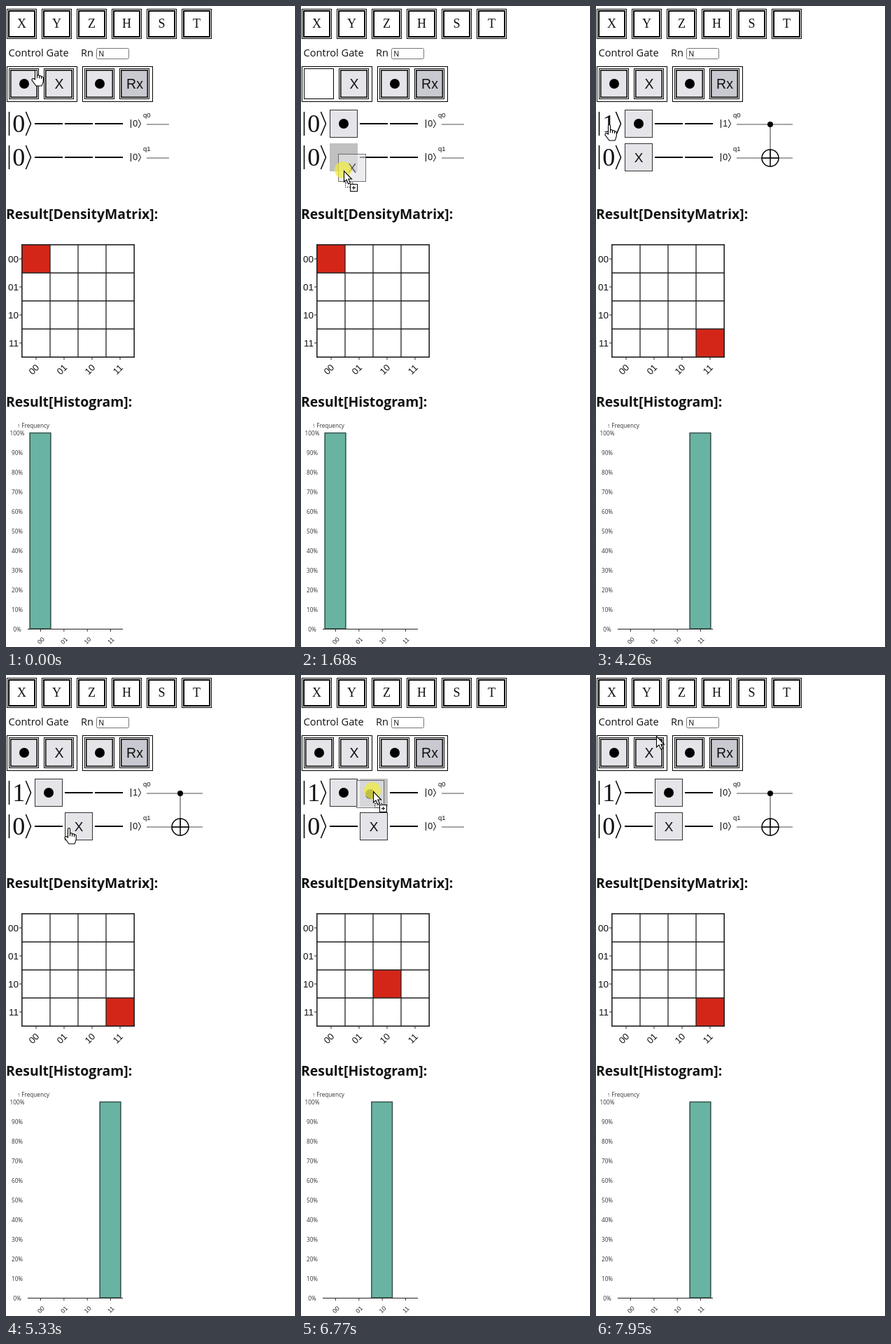
An HTML page with a canvas that plays this animation: 413x915 px, repeating every 8 s.

```html
<!DOCTYPE html>
<html lang="en">
<head>
<meta charset="utf-8">
<title>Quantum circuit editor</title>
<style>
html, body { margin: 0; width: 100%; height: 100%; overflow: hidden; background: #fff; }
canvas { display: block; }
</style>
</head>
<body>
<canvas id="stage" width="413" height="915"></canvas>
<script>
const ctx = document.getElementById('stage').getContext('2d');
const LOOP = 8000;
const SANS = '"Liberation Sans", sans-serif';
const SERIF = '"Liberation Serif", serif';
const UI = '"Open Sans", sans-serif';
const BASIS = ['00', '01', '10', '11'];

// Cursor path: time, x, y
const PATH = [
  [0, 43, 91], [69, 43, 91], [70, 31, 111], [269, 31, 111], [270, 55, 151], [430, 55, 151],
  [480, 61, 167], [560, 61, 167], [850, 63, 114], [960, 63, 114], [1140, 58, 195],
  [1250, 58, 195], [1480, 61, 235], [2480, 61, 235], [2900, 33, 168], [3240, 33, 168],
  [3310, 19, 169], [4320, 19, 169], [4600, 56, 216], [4680, 56, 216], [5000, 90, 218],
  [5930, 90, 218], [6090, 65, 164], [6300, 65, 164], [6700, 103, 166], [7600, 103, 168],
  [7930, 86, 87], [8000, 86, 87]
];
const DRAGS = [
  { gate: 'dot', start: 270, over: 440, drop: 500, dx: 25, dy: 20, col: 0, row: 0 },
  { gate: 'X', start: 960, over: 1310, drop: 1750, dx: 8, dy: 24, col: 0, row: 1 },
  { gate: 'X', start: 4680, over: 4800, drop: 5070, dx: 15, dy: 20, col: 1, row: 1 },
  { gate: 'dot', start: 6300, over: 6500, drop: 6900, dx: 24, dy: 16, col: 1, row: 0 }
];
const PRESSES = [[70, 500], [900, 1750], [3040, 3240], [4600, 5070], [6160, 6900]];
// Measured basis state, the time it shows and the time its bars start moving
const RESULTS = [
  { state: 0, at: 0, bars: -1000 }, { state: 3, at: 3240, bars: 3110 },
  { state: 2, at: 5620, bars: 5620 }, { state: 3, at: 6970, bars: 6920 }
];
const BAR_TIME = 380, STAGGER = 0.08;

const HAND = new Path2D('M-1.5 14V2Q-1.5 .5 0 .5T1.5 2V8Q4 7 4.5 9Q7 8 7.5 10Q10.3 9.5 10.3 12V16Q10 19 8 23H0Q-3 19 -6 15Q-6 12 -3.5 12.6Z');
const KNUCKLES = new Path2D('M1.5 8V12M4.5 9V12.5M7.5 10V13');
const ARROW = new Path2D('M.5 .5V16L4 12.8L6.8 19L9.4 17.8L6.8 12H11.5Z');

const within = (t, a, b) => t >= a && t < b;
const clamp = v => Math.min(1, Math.max(0, v));
const easeCubic = u => u < 0.5 ? 4 * u ** 3 : 1 - 4 * (1 - u) ** 3;
const slotX = col => 41 + 43 * col;
const slotY = row => 148 + 48 * row;

function text(str, x, y, size, family, { align = 'left', weight = 400, color = '#111', turn = 0 } = {}) {
  ctx.save();
  ctx.translate(x, y);
  ctx.rotate(turn);
  ctx.font = `${weight} ${size}px ${family}`;
  ctx.textAlign = align;
  ctx.fillStyle = color;
  ctx.fillText(str, 0, 0);
  ctx.restore();
}
function line(points, width = 1, color = '#000') {
  ctx.beginPath();
  points.forEach(([x, y]) => ctx.lineTo(x, y));
  ctx.lineWidth = width;
  ctx.strokeStyle = color;
  ctx.stroke();
}
function box(x, y, w, h, fill, stroke, width = 1) {
  if (fill) { ctx.fillStyle = fill; ctx.fillRect(x, y, w, h); }
  if (stroke) {
    ctx.strokeStyle = stroke;
    ctx.lineWidth = width;
    ctx.strokeRect(x + width / 2, y + width / 2, w - width, h - width);
  }
}
function disc(x, y, r, fill = '#000') {
  ctx.beginPath();
  ctx.arc(x, y, r, 0, 2 * Math.PI);
  ctx.fillStyle = fill;
  ctx.fill();
}
function shape(path, fill) {
  ctx.lineWidth = 1.1;
  ctx.strokeStyle = '#000';
  if (fill) { ctx.fillStyle = fill; ctx.fill(path); }
  ctx.stroke(path);
}

function gateLabel(label, cx, cy, size) {
  if (label === 'dot') disc(cx, cy, 7);
  else text(label, cx, cy + size * 0.36, size, SANS, { align: 'center' });
}
function paletteGate(label, x, fill = '#e4e4e9') {
  box(x, 89, 43, 44, '#fff', '#000');
  if (!label) return;
  box(x + 2, 91, 39, 40, fill, '#000', 1.5);
  gateLabel(label, x + 22, 111, 19.5);
}
function slotGate(label, x, y) {
  box(x, y, 40, 40, '#e4e4e9', '#333');
  gateLabel(label, x + 20, y + 20, 19);
}
function ket(digit, x, y, size, w, h, weight, family) {
  line([[x, y - h], [x, y + h]], weight);
  text(digit, x + w * 0.44, y + size * 0.34, size, family, { align: 'center' });
  line([[x + w * 0.77, y - h], [x + w, y], [x + w * 0.77, y + h]], weight);
}

function drawPalette(t) {
  [...'XYZHST'].forEach((name, i) => {
    const x = 1 + 50 * i;
    box(x, 4, 43, 43, '#fff', '#000');
    box(x + 2, 6, 39, 39, null, '#000', 2);
    text(name, x + 21.5, 31, 18, SERIF, { align: 'center' });
  });
  text('Control Gate', 3.5, 72, 14.6, UI);
  text('Rn', 107, 72, 14.6, UI);
  ctx.beginPath();
  ctx.roundRect(129.5, 60.5, 46, 15, 2);
  ctx.lineWidth = 1;
  ctx.strokeStyle = '#767676';
  ctx.stroke();
  text('N', 132.5, 72, 10.5, SANS);

  box(1, 86, 101, 51, null, '#000');
  box(109, 86, 101, 51, null, '#000');
  paletteGate(within(t, 500, 1750) ? '' : 'dot', 4);
  paletteGate('X', 54);
  paletteGate('dot', 112);
  paletteGate('Rx', 162, '#c9c9d1');
}

function drawCircuit(t, drag) {
  const linked = within(t, 1820, 5620) || t >= 6970;
  const placed = [-1, -1];
  DRAGS.forEach(d => { if (t >= d.drop) placed[d.row] = d.col; });
  for (const row of [0, 1]) {
    const y = slotY(row) + 20;
    ket(row === 0 && t >= 3240 ? '1' : '0', 4.5, y, 36, 31, 17, 1.5, SERIF);
    for (let col = 0; col < 3; col++) {
      const x = slotX(col);
      if (placed[row] === col) slotGate(row ? 'X' : 'dot', x, slotY(row));
      else if (drag && t >= drag.over && drag.row === row && drag.col === col) box(x, slotY(row), 40, 40, '#c0c0c0');
      else line([[x, y], [x + 40, y]], 2);
    }
    ket(row === 0 && within(t, 3240, 5620) ? '1' : '0', 178.5, y, 12.5, 14, 6, 1, SANS);
    text('q' + row, 196, y - 9, 9.5, SANS);
    line([[201, y + 1], [linked ? 281 : 233, y + 1]], 1.5, '#888');
  }
  if (!linked) return;
  line([[249, 169], [249, 217]], 1.2, '#555');
  disc(249, 169, 4);
  ctx.beginPath();
  ctx.arc(249, 217, 12, 0, 2 * Math.PI);
  ctx.lineWidth = 1.5;
  ctx.strokeStyle = '#000';
  ctx.stroke();
  line([[249, 205], [249, 229]], 1.5);
  line([[237, 217], [261, 217]], 1.5);
}

function drawMatrix(t) {
  text('Result[DensityMatrix]:', 0, 304, 19.4, UI, { weight: 700 });
  const { state } = RESULTS.findLast(r => t >= r.at);
  box(23 + 40 * state, 341 + 40 * state, 40, 40, '#d32618');
  BASIS.forEach((name, i) => {
    const mid = 40 * i + 20;
    if (i) {
      line([[23 + 40 * i, 341], [23 + 40 * i, 501]], 1.3, '#222');
      line([[23, 341 + 40 * i], [183, 341 + 40 * i]], 1.3, '#222');
    }
    line([[19, 341 + mid], [23, 341 + mid]], 1, '#222');
    line([[23 + mid, 501], [23 + mid, 505]], 1, '#222');
    text(name, 18, 346 + mid, 13.5, SANS, { align: 'right' });
    text(name, 23 + mid, 522, 13, SANS, { align: 'center', turn: -Math.PI / 4 });
  });
  box(22, 340, 162, 162, null, '#222', 1.6);
}

function drawHistogram(t) {
  text('Result[Histogram]:', 0, 572, 19.4, UI, { weight: 700 });
  text('↑', 18, 602, 8.5, UI, { align: 'center', color: '#333' });
  text('Frequency', 62, 602, 8.2, UI, { align: 'right', color: '#333' });
  for (let p = 0; p <= 100; p += 10) {
    text(p + '%', 16, 893 - 2.8 * p, 8.2, UI, { align: 'center', color: '#333' });
  }
  const k = RESULTS.findLastIndex(r => t >= r.bars);
  const now = RESULTS[k], before = RESULTS[Math.max(0, k - 1)];
  BASIS.forEach((name, i) => {
    const x = 34 + 33.33 * i;
    const u = easeCubic(clamp((t - now.bars) / BAR_TIME - STAGGER * i));
    const h = 280 * ((before.state === i) * (1 - u) + (now.state === i) * u);
    if (h > 0.5) box(x - 0.5, 889.5 - h - 0.7, 31, h + 0.9, '#69b3a2', '#36504a', 1.4);
    line([[x + 15.5, 889], [x + 15.5, 893]], 1, '#333');
    text(name, x + 18, 908, 8.8, SANS, { align: 'center', turn: -Math.PI / 4, color: '#222' });
  });
  line([[31, 889.5], [167, 889.5]], 1, '#222');
}

function cursorAt(t) {
  const i = PATH.findIndex(p => p[0] > t);
  const [t0, x0, y0] = PATH[i - 1], [t1, x1, y1] = PATH[i];
  const u = (t - t0) / (t1 - t0), s = u * u * (3 - 2 * u);
  return [Math.round(x0 + (x1 - x0) * s), Math.round(y0 + (y1 - y0) * s)];
}
function drawCursor(t, drag) {
  const [x, y] = cursorAt(t);
  if (drag) {
    ctx.globalAlpha = 0.65;
    slotGate(drag.gate, x - drag.dx, y - drag.dy);
    ctx.globalAlpha = 1;
  }
  if (PRESSES.some(([a, b]) => within(t, a, b))) disc(x - 1, y - 1, 12, 'rgba(240,235,60,.72)');
  ctx.save();
  ctx.translate(x, y);
  if (drag) {
    ctx.setLineDash([1.5, 1.5]);
    box(2, 17, 12, 7, null, '#000');
    ctx.setLineDash([]);
    box(9, 19, 11, 11, '#fff', '#000');
    line([[12, 24.5], [17, 24.5]]);
    line([[14.5, 22], [14.5, 27]]);
  }
  if (drag || t >= 7800) {
    shape(ARROW, '#fff');
  } else {
    shape(HAND, '#fff');
    shape(KNUCKLES);
  }
  ctx.restore();
}

function frame() {
  const t = performance.now() % LOOP;
  const drag = DRAGS.find(d => within(t, d.start, d.drop));
  box(0, 0, 413, 915, '#fff');
  drawPalette(t);
  drawCircuit(t, drag);
  drawMatrix(t);
  drawHistogram(t);
  drawCursor(t, drag);
  requestAnimationFrame(frame);
}
frame();
</script>
</body>
</html>
```
